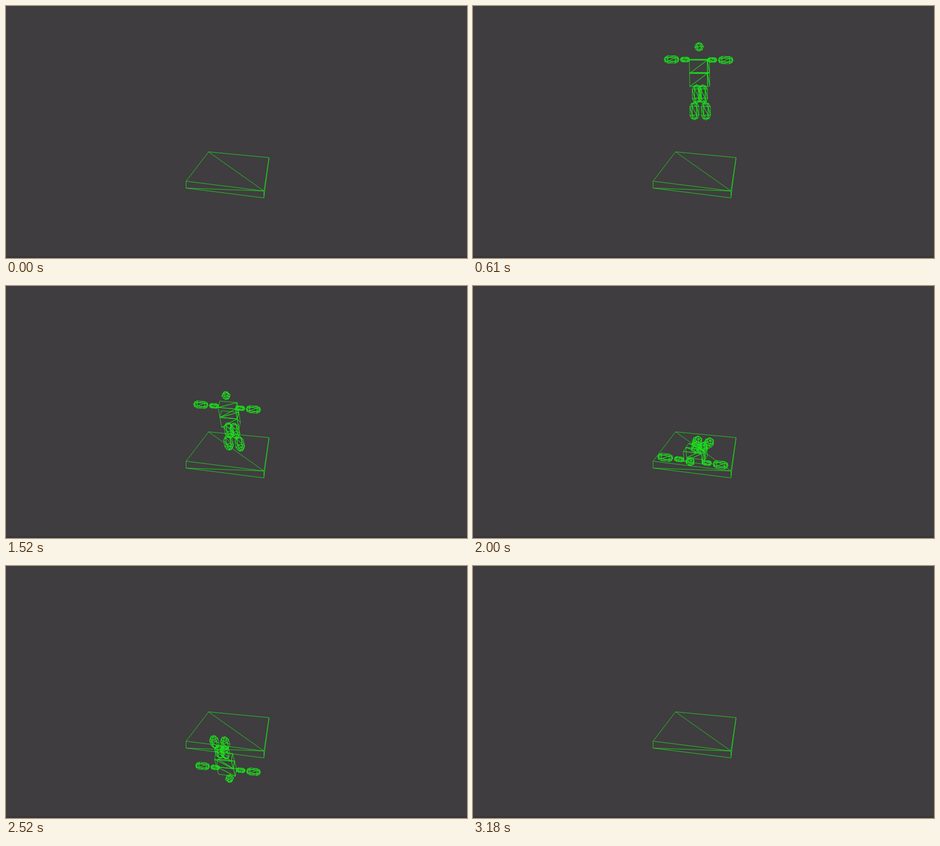
Write an HTML page that moves like this. It is 800 px wide and 438 px high and loops after 3.21 s.

```html
<!DOCTYPE html>
<html lang="en">
<head>
<meta charset="utf-8">
<title>Wireframe ragdoll</title>
<style>
  html, body { margin: 0; width: 100%; height: 100%; overflow: hidden; background: #3f3d3f; }
  svg { display: block; width: 100%; height: 100%; }
  path { fill: none; stroke: #1ee01e; stroke-width: 0.8; }
</style>
</head>
<body>
<svg viewBox="0 0 800 438">
  <rect width="800" height="438" fill="#3f3d3f"/>
  <rect y="435" width="800" height="3" fill="#383638"/>
  <path d="M351.5 253.5L456.5 263.5L447.5 321.5L312.5 304.5ZL447.5 321.5
           M312.5 304.5V316.5L447.5 321.5V333.5L312.5 316.5M447.5 333.5L456.5 263.5"/>
  <path id="doll"/>
</svg>
<script>
const LOOP = 3210, SPAWN = 30, GONE = 3180;
const GRAVITY = 0.00025, SLIP_SPEED = 0.24, SPIN = 0.0036;
const SIDES = 6;
const doll = document.getElementById('doll');

// Hip position, pitch (0 upright, PI upside down) and size of the whole body
const poses = [
  { t: 610, x: 393, y: 139, pitch: 0.08, size: 1 },
  { t: 1090, x: 391, y: 235, pitch: 0.45, size: 0.94 },
  { t: 1520, x: 390, y: 241, pitch: 0.7, size: 0.97 },
  { t: 2000, x: 390, y: 284, pitch: 1.86, size: 1.02 },
  { t: 2180, x: 383, y: 285, pitch: 2.85, size: 0.98 },
  { t: 2520, x: 377, y: 330, pitch: 4.07, size: 0.94 }
];

const mix = (a, b, p) => a + (b - a) * p;
const cross = (a, b) => a[0] * b[1] - a[1] * b[0];
const loop = points =>
  'M' + points.map(([x, y]) => (x + 0.5).toFixed(1) + ' ' + (y + 0.5).toFixed(1)).join('L') + 'Z';

// Only the sides facing the viewer are drawn
function boxPath(c, u, v, w) {
  let d = '';
  for (const [a, b, n] of [[u, v, w], [v, w, u], [w, u, v]]) {
    const side = Math.sign(cross(a, b));
    const corner = (i, j) => [0, 1].map(k => c[k] + side * n[k] + i * a[k] + j * b[k]);
    d += loop([corner(-1, -1), corner(1, -1), corner(1, 1), corner(-1, 1)]);
    d += loop([corner(-1, 1), corner(1, -1)]);
  }
  return d;
}

// Low-poly capsule along a projected unit axis; a half length of 0 gives a ball
function capsulePath(c, [ax, ay], half, r) {
  const flat = Math.hypot(ax, ay);
  const az = Math.sqrt(Math.max(0, 1 - flat * flat));
  const px = -ay / flat, py = ax / flat;
  const q = [-az * py, az * px, ax * py - ay * px];
  const vertex = (ring, i) => {
    const end = ring < 3 ? -half : half;
    const lat = (ring - (ring < 3 ? 2 : 3)) * Math.PI / 4;
    const lon = i * 2 * Math.PI / SIDES;
    const m = Math.cos(lat) * Math.cos(lon), n = Math.cos(lat) * Math.sin(lon), s = Math.sin(lat);
    return [
      c[0] + end * ax + r * (m * px + n * q[0] + s * ax),
      c[1] + end * ay + r * (m * py + n * q[1] + s * ay),
      n * q[2] + s * az
    ];
  };
  let d = '';
  for (let ring = 0; ring < 5; ring++) {
    for (let i = 0; i < SIDES; i++) {
      const a = vertex(ring, i), b = vertex(ring, i + 1);
      const e = vertex(ring + 1, i), f = vertex(ring + 1, i + 1);
      const faces = ring === 0 ? [[a, e, f]] : ring === 4 ? [[a, b, e]] : [[a, b, f], [a, f, e]];
      for (const face of faces) {
        if (face.reduce((z, point) => z + point[2], 0) > 0.01) d += loop(face);
      }
    }
  }
  return d;
}

function poseAt(t) {
  const last = poses[poses.length - 1];
  if (t >= last.t) {
    const dt = t - last.t;
    return { ...last, y: last.y + SLIP_SPEED * dt, pitch: last.pitch + SPIN * dt };
  }
  const k = Math.max(0, poses.findIndex(pose => pose.t > t) - 1);
  const from = poses[k], to = poses[k + 1];
  let p = (t - from.t) / (to.t - from.t);
  if (k === 0) {
    const drop = GRAVITY * ((t - SPAWN) ** 2 - (from.t - SPAWN) ** 2);
    p = Math.min(1, drop / (to.y - from.y));
  }
  if (k === 2) p **= 1.8;
  const pose = {};
  for (const key in from) pose[key] = mix(from[key], to[key], p);
  return pose;
}

function dollPath({ x, y, pitch, size }) {
  const sin = Math.sin(pitch), cos = Math.cos(pitch);
  const right = [1, 0.14 * Math.abs(sin)];
  const down = [0.2 * sin, cos];
  const front = [-0.2 * cos, sin];
  const scaled = (v, n) => v.map(c => c * n * size);
  const place = (r, d, f = 0) =>
    [x, y].map((c, i) => c + size * (r * right[i] + d * down[i] + f * front[i]));
  const box = d => boxPath(place(0, d), scaled(right, 15.5), scaled(down, 11.7), scaled(front, 9));
  const limb = (at, axis, half, r) => capsulePath(at, axis, half * size, r * size);

  let d = box(-35) + box(-12) + limb(place(0, -69), down, 0, 7.6);
  for (const side of [-1, 1]) {
    d += limb(place(23.5 * side, -47, 6), right, 4, 4.2)
      + limb(place(47 * side, -47, 6), right, 6.5, 6.4)
      + limb(place(5.2 * side, 13), down, 8, 8)
      + limb(place(10 * side, 43), down, 7.5, 7.8);
  }
  return d;
}

const start = performance.now();
function frame(now) {
  const t = Math.max(0, now - start) % LOOP;
  doll.setAttribute('d', t >= SPAWN && t < GONE ? dollPath(poseAt(t)) : '');
  requestAnimationFrame(frame);
}
frame(start);
</script>
</body>
</html>
```
